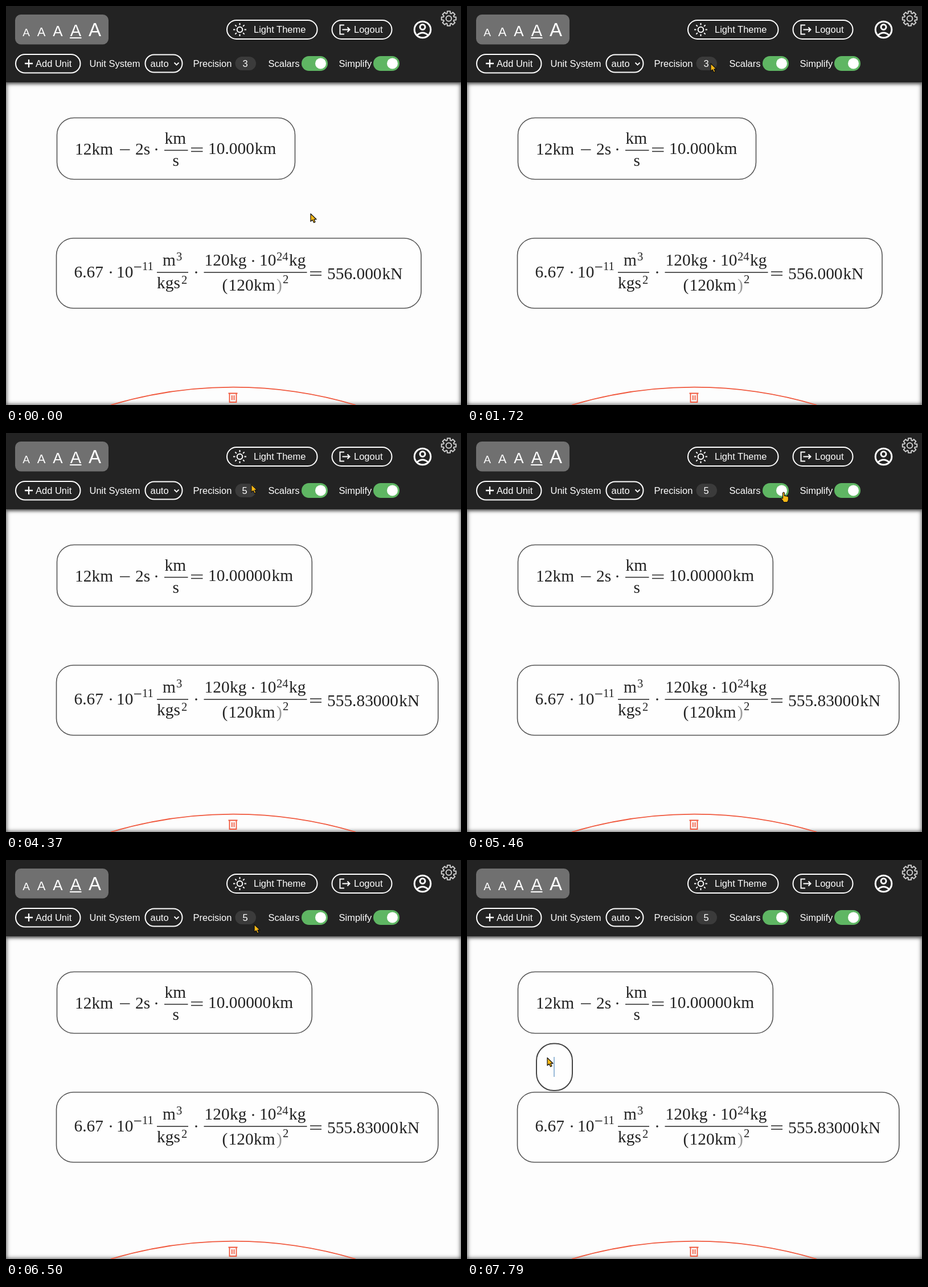
Recreate the animation shown at these times as an HTML page. Size 799 by 701 pixels, loop 8000 ms.

```html
<!DOCTYPE html>
<html lang="en">
<head>
<meta charset="utf-8">
<title>Unit calculator</title>
<style>
html, body { margin: 0; width: 100%; height: 100%; overflow: hidden; background: #fdfdfd; }
#board, #bar { position: absolute; left: 0; width: 799px; }
#board { top: 134px; height: 567px; box-shadow: inset 0 0 7px 1px #555; }
#bar { top: 0; height: 134px; background: #232323; box-shadow: 0 1px 7px #444; }
svg { position: absolute; left: 0; top: 0; }
.ui { font: 16.5px "Liberation Sans", Arial, sans-serif; fill: #fff; }
.math { font: 29.4px "Liberation Serif", "Times New Roman", serif; fill: #222; }
.sup { font-size: 20.6px; }
.line { fill: none; stroke: #fff; stroke-width: 2; }
.rule { stroke: #222; stroke-width: 1.3; }
.box { fill: #fefefe; stroke: #555; stroke-width: 1.6; }
.red { fill: none; stroke: #f0573c; stroke-width: 1.8; }
.cursor { fill: #f8b816; stroke: #111; stroke-width: 1.2; stroke-linejoin: round; }
</style>
</head>
<body>
<div id="board"></div>
<div id="bar"></div>
<svg width="799" height="701" viewBox="0 0 799 701">
  <g class="ui">
    <rect x="16" y="15" width="164" height="52.5" rx="10" fill="#707070"/>
    <g text-anchor="middle">
      <text x="35.5" y="53" font-size="19">A</text>
      <text x="62" y="53" font-size="22">A</text>
      <text x="91" y="53" font-size="26">A</text>
      <text x="122.5" y="53" font-size="29">A</text>
      <text x="156" y="53" font-size="33">A</text>
    </g>
    <path class="line" d="M112 56H132.500"/>
    <g class="line">
      <rect x="388" y="25" width="158.500" height="33" rx="16.500"/>
      <rect x="572.500" y="25" width="105" height="33" rx="16.500"/>
      <rect x="17" y="85" width="113.500" height="32.500" rx="16.250"/>
      <rect x="244.500" y="85.500" width="65" height="31" rx="15.500"/>
      <circle cx="410.500" cy="41.500" r="4.800"/>
      <path id="rays"/>
      <path d="M594 33.500H586.500V49.500H594M590.500 41.500H603M599.500 37.500L603.500 41.500L599.500 45.500"/>
      <path d="M33 101H47M40 94V108" stroke-width="2.300"/>
      <path d="M295.500 99.500L299.500 103.500L303.500 99.500" stroke-width="1.800"/>
      <g style="stroke-width:3">
        <circle cx="731.500" cy="41.500" r="14.300"/>
        <circle cx="731.500" cy="37" r="4.500"/>
        <path d="M721.500 51.500Q731.500 42.500 741.500 51.500"/>
      </g>
      <g style="stroke:#ccc">
        <path id="gear" stroke-linejoin="round"/>
        <circle cx="777.500" cy="22" r="4.800"/>
      </g>
    </g>
    <text x="435" y="47">Light Theme</text>
    <text x="611" y="47">Logout</text>
    <text x="52" y="106.500">Add Unit</text>
    <text x="146.500" y="106.500">Unit System</text>
    <text x="253.500" y="106.500">auto</text>
    <text x="328.500" y="106.500">Precision</text>
    <text x="460.500" y="106.500">Scalars</text>
    <text x="584.500" y="106.500">Simplify</text>
    <rect x="402.500" y="89" width="36.500" height="24" rx="12" fill="#3b3b3b"/>
    <text id="digits" y="106.500">3</text>
    <path id="caret" d="M423.200 93V109" stroke="#fff" stroke-width="1.300"/>
    <rect id="track" x="519" y="88" width="46" height="26" rx="13"/>
    <circle id="knob" cy="101" r="9.500"/>
    <rect x="645" y="88" width="46" height="26" rx="13" fill="#5fb663"/>
    <circle cx="678.500" cy="101" r="9.500"/>
  </g>

  <path class="red" d="M184 701A754 754 0 0 1 614 701"/>
  <path class="red" d="M390.500 680.500H406.500M392.500 680.500V696H404.500V680.500M396.800 684V692.500M400.500 684V692.500"/>

  <rect class="box" id="box1" x="89.500" y="196.500" height="108" rx="30"/>
  <rect class="box" id="box2" x="88.500" y="408" height="123" rx="30"/>
  <g class="math">
    <text x="121" y="261">12</text><text x="150.500" y="261">km</text>
    <text x="227" y="261">2s</text>
    <text x="278.500" y="242">km</text><text x="292.500" y="281">s</text>
    <text id="num1" x="355" y="260"></text><text id="unit1" y="260">km</text>

    <text x="119.500" y="476.500">6.67</text><text x="194" y="476.500">10</text>
    <text class="sup" x="239" y="464">11</text>
    <text x="275" y="456">m</text><text class="sup" x="299" y="447">3</text>
    <text x="265" y="496">kgs</text><text class="sup" x="308" y="487.500">2</text>
    <text x="348.500" y="456">120</text><text x="393" y="456">kg</text>
    <text x="445" y="456">10</text><text class="sup" x="475" y="447">24</text>
    <text x="497" y="456">kg</text>
    <text x="379.500" y="500">(</text><text x="390.500" y="500">120</text>
    <text x="435" y="500">km</text><text x="475" y="500" fill="#999">)</text>
    <text class="sup" x="486" y="487">2</text>
    <text id="num2" x="564" y="479.500"></text><text id="unit2" y="479.500">kN</text>
    <circle cx="264" cy="252" r="1.800"/><circle cx="184" cy="468" r="1.800"/>
    <circle cx="334" cy="468" r="1.800"/><circle cx="434" cy="448" r="1.800"/>
    <path class="rule" d="M200 252.500H217.500M278 253.500H319.500M325 249.500H345.500M325 255.500H345.500
      M225 458.500H237.500M265 468H320M347.500 468H528.500M534 467H554M534 473H554"/>
  </g>
  <g id="fresh">
    <rect x="122" y="322.500" width="63" height="82.500" rx="30" fill="#fefefe" stroke="#444" stroke-width="2"/>
    <path d="M153 346V381" stroke="#7fa9cf" stroke-width="1.600"/>
  </g>

  <path class="cursor" id="arrow" d="M0 0V13.500L3.200 10.800L5.600 15.600L8 14.500L5.800 9.800H10Z"/>
  <path class="cursor" id="hand" d="M-1.500 1.500Q0 -1.500 1.500 1.500V6.500Q3 5.500 4 7Q5.500 6 6.500 7.500Q8.500 7 8.500 9.500V13Q8 16 6.500 17.500H0Q-1 15 -4.500 11.500Q-4.500 9 -1.500 11Z"/>
</svg>
<script>
const el = id => document.getElementById(id);
const set = (id, attrs) => { for (const k in attrs) el(id).setAttribute(k, attrs[k]); };
const show = (id, on) => set(id, { visibility: on ? 'visible' : 'hidden' });
const smooth = u => { u = Math.min(1, Math.max(0, u)); return u * u * (3 - 2 * u); };
const ramp = (t, a, b) => smooth((t - a) / (b - a));
const polar = (x, y, r, a) => `${x + r * Math.cos(a)} ${y + r * Math.sin(a)}`;

let rays = '', gear = '';
for (let i = 0; i < 8; i++) {
  const a = i * Math.PI / 4;
  rays += `M${polar(410.5, 41.5, 8, a)}L${polar(410.5, 41.5, 11.5, a)}`;
  [[-.3, 9.5], [-.2, 13], [.2, 13], [.3, 9.5]].forEach(([d, r]) =>
    gear += (gear ? 'L' : 'M') + polar(777.5, 22, r, a + d));
}
set('rays', { d: rays });
set('gear', { d: gear + 'Z' });

// start, end, then the points of a quadratic path
const moves = [
  [130, 890, 535, 365, 560, 230, 572, 92],
  [960, 1720, 572, 92, 490, 67, 428, 101],
  [2260, 2580, 428, 101, 430, 97, 428.5, 92],
  [4300, 5080, 428.5, 92, 480, 60, 556, 104],
  [6320, 6770, 556, 104, 390, 122, 208, 112],
  [6980, 7050, 208, 112, 140, 100, 90, 95],
  [7050, 7580, 90, 95, 132, 221, 141, 347.5]
];

function pointer(t) {
  const [a, b, x0, y0, x1, y1, x2, y2] = moves.filter(m => t >= m[0]).pop() || moves[0];
  const u = ramp(t, a, b), v = 1 - u;
  const mix = (p, q, r) => v * v * p + 2 * u * v * q + u * u * r;
  return [mix(x0, x1, x2), mix(y0, y1, y2)];
}

const results = { 3: ['10.000', '556.000'], 4: ['10.0000', '555.8000'], 5: ['10.00000', '555.83000'] };
const blinks = [3010, 3210, 3500, 3770, 4020, 4300, 4520, 4780, 5020, 5260];

function draw(t) {
  const digits = t < 3010 ? 3 : t < 3500 ? 4 : 5;
  const extra = (digits - 3) * 14.9;
  el('digits').textContent = digits;
  set('digits', { x: t >= 3010 && t < 5460 ? 414.5 : 415.5 });
  results[digits].forEach((s, i) => el('num' + (i + 1)).textContent = s);
  set('unit1', { x: 436.7 + extra });
  set('unit2', { x: 660.5 + extra });
  set('box1', { width: 418 + extra });
  set('box2', { width: 640.5 + extra });
  show('caret', blinks.filter(b => t >= b).length % 2);

  const on = 1 - ramp(t, 5570, 5800) + ramp(t, 6080, 6300);
  const blend = (a, b) => Math.round(a + (b - a) * on);
  set('knob', { cx: 533 + 19.5 * on });
  set('track', { fill: `rgb(${blend(200, 95)},${blend(200, 182)},${blend(200, 99)})` });
  show('fresh', t >= 7790);

  const [x, y] = pointer(t);
  const hand = (t > 4940 && t < 6370) || (t > 7010 && t < 7120);
  show('hand', hand);
  show('arrow', !hand);
  set(hand ? 'hand' : 'arrow', { transform: `translate(${x} ${y})` });
}

function tick() {
  draw(performance.now() % 8000);
  requestAnimationFrame(tick);
}
tick();
</script>
</body>
</html>
```
